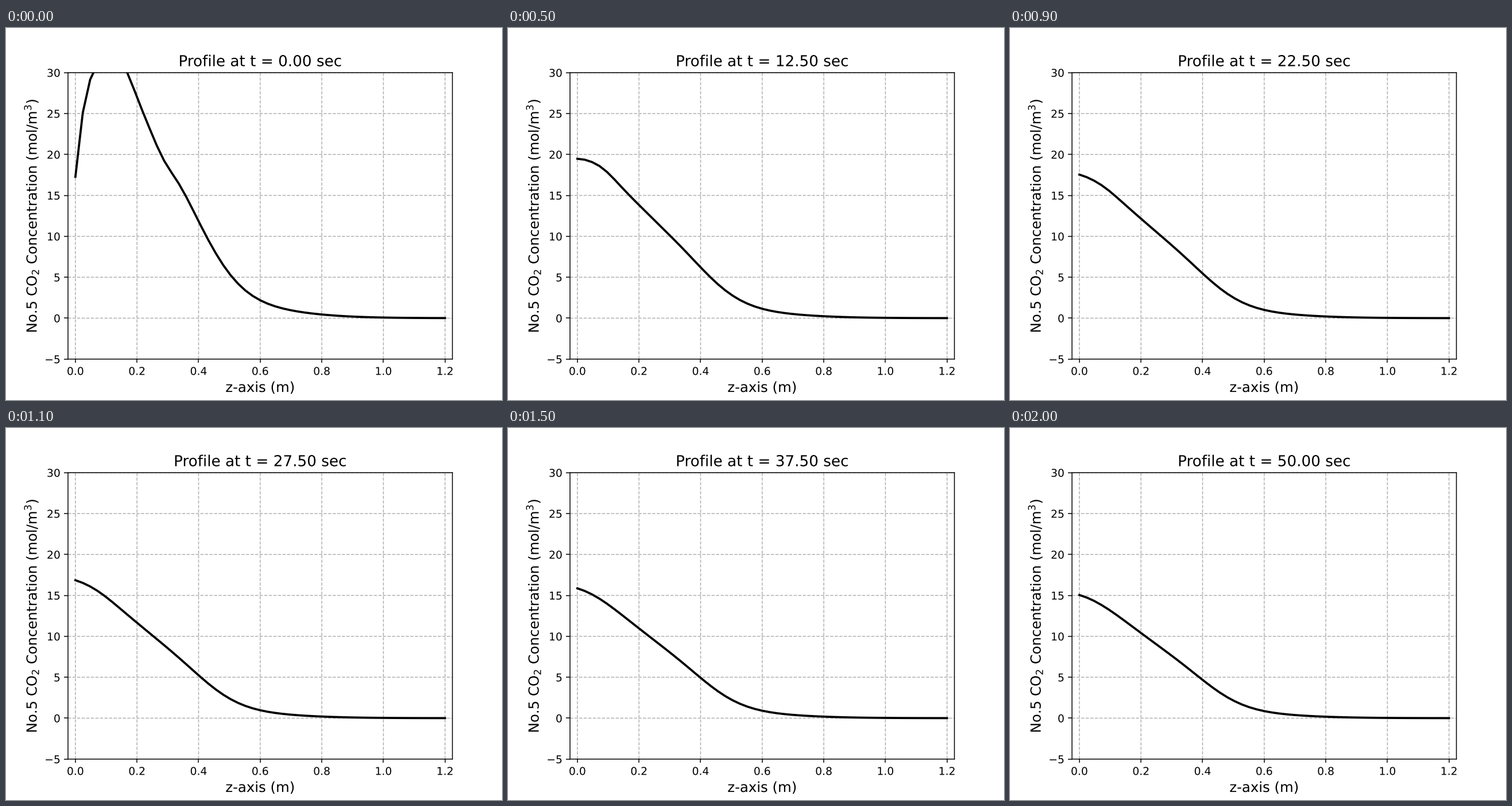
A matplotlib script that plays this animation: 864 by 648 pixels, repeating every 2.1 s.

```python
import numpy as np
import matplotlib.pyplot as plt
from matplotlib import patheffects
from matplotlib.animation import FuncAnimation

FRAMES, INTERVAL, DT = 21, 100, 2.5

z = np.linspace(0, 1.2, 51)


def bump(center, width):
    return np.exp(-((z - center) / width) ** 2)


def fall(center, width):
    """Smooth step from 1 down to 0."""
    return 1 / (1 + np.exp((z - center) / width))


# Settled shape: inlet hump, main front and a thin tail
SETTLED = 19.65 * bump(-0.049, 0.267) + 18.3 * fall(0.411, 0.0758) + 0.9 * fall(0.75, 0.1)


def profile(t):
    level = 0.25 + 0.75 / np.sqrt(1 + t / 1.935)
    fade = np.exp(-t / 4.2)
    # Start-up transient: depleted inlet, a crest drifting upstream, a dip behind it
    inlet = -20.85 * fade * np.exp(-z / 0.045)
    crest = 2.1 * np.exp(-t / 11) * bump(0.08 + 0.07 * fade, 0.055)
    dip = -0.9 * fade * bump(0.285, 0.045)
    return level * (SETTLED + inlet + crest + dip)


# Unsnapped lines and outline text keep everything at sub-pixel positions
plt.rcParams.update({
    "font.family": "DejaVu Sans",
    "text.hinting": "no_hinting",
    "path.snap": False,
    "path.effects": [patheffects.Normal()],
})

fig, ax = plt.subplots(figsize=(6.4, 4.8), dpi=135)
line, = ax.plot(z, profile(0), color="black", lw=2)
ax.set_xlim(-0.024, 1.224)
ax.set_ylim(-5, 30)
ax.grid(ls="--")
ax.set_xlabel("z-axis (m)", fontsize=13)
ax.set_ylabel("No.5 CO$_2$ Concentration (mol/m$^3$)", fontsize=13)
title = ax.set_title("", fontsize=14)


def update(i):
    t = i * DT
    line.set_ydata(profile(t))
    title.set_text(f"Profile at t = {t:.2f} sec")
    return line, title


anim = FuncAnimation(fig, update, frames=FRAMES, interval=INTERVAL,
                     repeat=True, repeat_delay=0)
plt.show()
```
